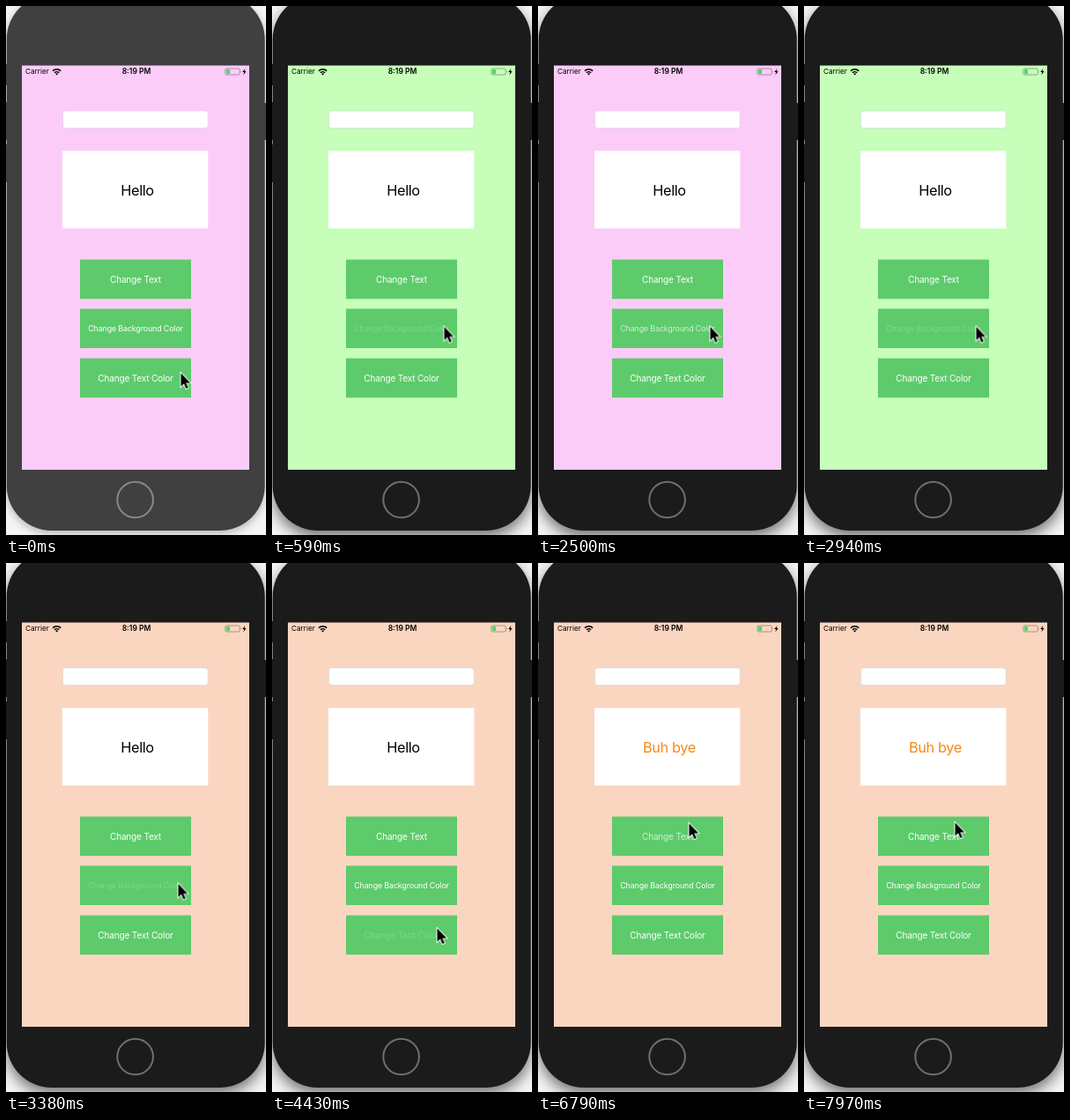
These frames come from a looping animation (295 by 600 pixels, 8000 ms). An HTML page:

```html
<!DOCTYPE html>
<html lang="en">
<head>
<meta charset="utf-8">
<title>Button demo</title>
<style>
  html, body { margin: 0; width: 100%; height: 100%; overflow: hidden; background: #f5f4f5; }
  svg { display: block; width: 295px; height: 600px; font-family: Inter, Roboto, sans-serif; }

  .anim { animation: 8s step-end -2ms infinite; }
  .phone { animation-name: activate; }
  .ring { animation-name: ring; }
  .screen { animation-name: background; }
  .cursor { animation-name: move; }
  .label { animation-name: recolor; font-size: 16.3px; letter-spacing: -.35px; }
  .hello { animation-name: hello; }
  .bye { animation-name: bye; }
  .tap-text { animation-name: tapText; }
  .tap-background { animation-name: tapBackground; }
  .tap-color { animation-name: tapColor; }

  .middle { text-anchor: middle; }
  .buttons rect { fill: #5dcb6b; }
  .buttons text { fill: #fff; font-size: 10px; letter-spacing: -.16px; }
  .buttons .small { font-size: 8.9px; letter-spacing: -.13px; }

  @keyframes activate {
    0% { fill: #404040; filter: drop-shadow(0 3px 5px #0004); }
    5.5%, 100% { fill: #1b1b1b; filter: drop-shadow(0 7px 8px #0008); }
  }
  @keyframes ring {
    0% { stroke: #898989; }
    5.5%, 100% { stroke: #707070; }
  }
  @keyframes background {
    0%, 27.625% { fill: #fcccf8; }
    7.375%, 36.75% { fill: #c6feba; }
    18.375%, 42.25%, 100% { fill: #fad6c1; }
  }
  @keyframes recolor {
    0% { fill: #000; }
    57.125%, 100% { fill: #f98712; }
  }
  @keyframes hello {
    0% { opacity: 1; }
    83.125%, 100% { opacity: 0; }
  }
  @keyframes bye {
    0% { opacity: 0; }
    83.125%, 100% { opacity: 1; }
  }
  @keyframes tapBackground {
    0%, 11%, 22%, 33.125%, 40.5%, 46%, 100% { opacity: 1; }
    5.5%, 7.375%, 16.5%, 18.375%, 27.625%, 34.875%, 36.75%, 42.25% { opacity: .2; }
    9.25%, 20.125%, 31.25%, 38.625%, 44.125% { opacity: .7; }
  }
  @keyframes tapColor {
    0%, 60.875%, 100% { opacity: 1; }
    55.375%, 57.125% { opacity: .2; }
    59% { opacity: .7; }
  }
  @keyframes tapText {
    0%, 86.625%, 100% { opacity: 1; }
    81.25%, 83.125% { opacity: .2; }
    84.875% { opacity: .7; }
  }
  @keyframes move {
    0% { transform: translate(197.5px, 415px); }
    1.75% { transform: translate(198px, 393px); }
    3.625% { transform: translate(195px, 365px); }
    5.5% { transform: translate(194.5px, 362.5px); }
    46% { transform: translate(193px, 386px); }
    47.875% { transform: translate(186px, 414px); }
    51.625% { transform: translate(186.5px, 413px); }
    62.75% { transform: translate(185px, 408px); }
    64.5% { transform: translate(180px, 385px); }
    66.375% { transform: translate(172px, 345px); }
    68.25% { transform: translate(167px, 302px); }
    70.125% { transform: translate(168px, 230px); }
    71.875% { transform: translate(169.5px, 181px); }
    73.75% { transform: translate(171px, 222px); }
    75.625% { transform: translate(172px, 278px); }
    77.5% { transform: translate(170.5px, 294px); }
    99.625%, 100% { transform: translate(170.5px, 293px); }
  }
</style>
</head>
<body>
<svg viewBox="0 0 295 600">
  <g class="anim phone">
    <rect x=".7" y="-13" width="293" height="608" rx="51"/>
    <path d="M0 66h2v24H0zM0 109h2v43H0zM0 157h2v43H0zM293 110h2v42h-2z"/>
  </g>
  <circle class="anim ring" cx="146.6" cy="560" r="20.3" fill="none" stroke-width="2"/>
  <rect class="anim screen" x="18" y="67.5" width="258" height="458.5"/>

  <g class="status">
    <text x="22" y="77.4" font-size="8.2">Carrier</text>
    <g fill="none" stroke="#000" stroke-width="1.5">
      <path d="M53 73.6a6.5 6.5 0 0 1 9.2 0M55 75.7a3.7 3.7 0 0 1 5.2 0"/>
    </g>
    <path d="M57.6 78.4l-1.5-1.5a2.1 2.1 0 0 1 3 0z"/>
    <text class="middle" x="148" y="77.4" font-size="8.5" font-weight="600">8:19 PM</text>
    <rect x="248.8" y="71" width="16.4" height="7" rx="1.6" fill="none" stroke="#000" stroke-opacity=".4" stroke-width=".8"/>
    <path d="M266.1 73.2q1.3 1.3 0 2.6z" opacity=".4"/>
    <rect x="250" y="72.1" width="4" height="4.8" rx=".6" fill="#4cd964"/>
    <path d="M271.4 71l-3.2 4h2l-.9 3.2 3.3-4.2h-2z"/>
  </g>

  <rect x="64.5" y="119" width="164.7" height="19.6" rx="3.3" fill="#fff" stroke="#ccc" stroke-opacity=".7" stroke-width=".7"/>
  <rect x="64" y="164.3" width="165.3" height="88" fill="#fff"/>
  <g class="anim label middle">
    <text class="anim hello" x="149" y="214.8">Hello</text>
    <text class="anim bye" x="149" y="214.8">Buh bye</text>
  </g>

  <g class="buttons middle">
    <rect x="84" y="287.6" width="126" height="44.6"/>
    <rect x="84" y="343.4" width="126" height="44.6"/>
    <rect x="84" y="399.6" width="126" height="44.6"/>
    <text class="anim tap-text" x="147" y="313.6">Change Text</text>
    <text class="anim tap-background small" x="147" y="368.7">Change Background Color</text>
    <text class="anim tap-color" x="147" y="425.7">Change Text Color</text>
  </g>

  <path class="anim cursor" d="M1 1.5V16.6L4.5 13.3 6.9 19 9.2 18 6.8 12.4H11.6Z"
    stroke="#fff" stroke-width="1.8" paint-order="stroke"/>
</svg>
</body>
</html>
```
